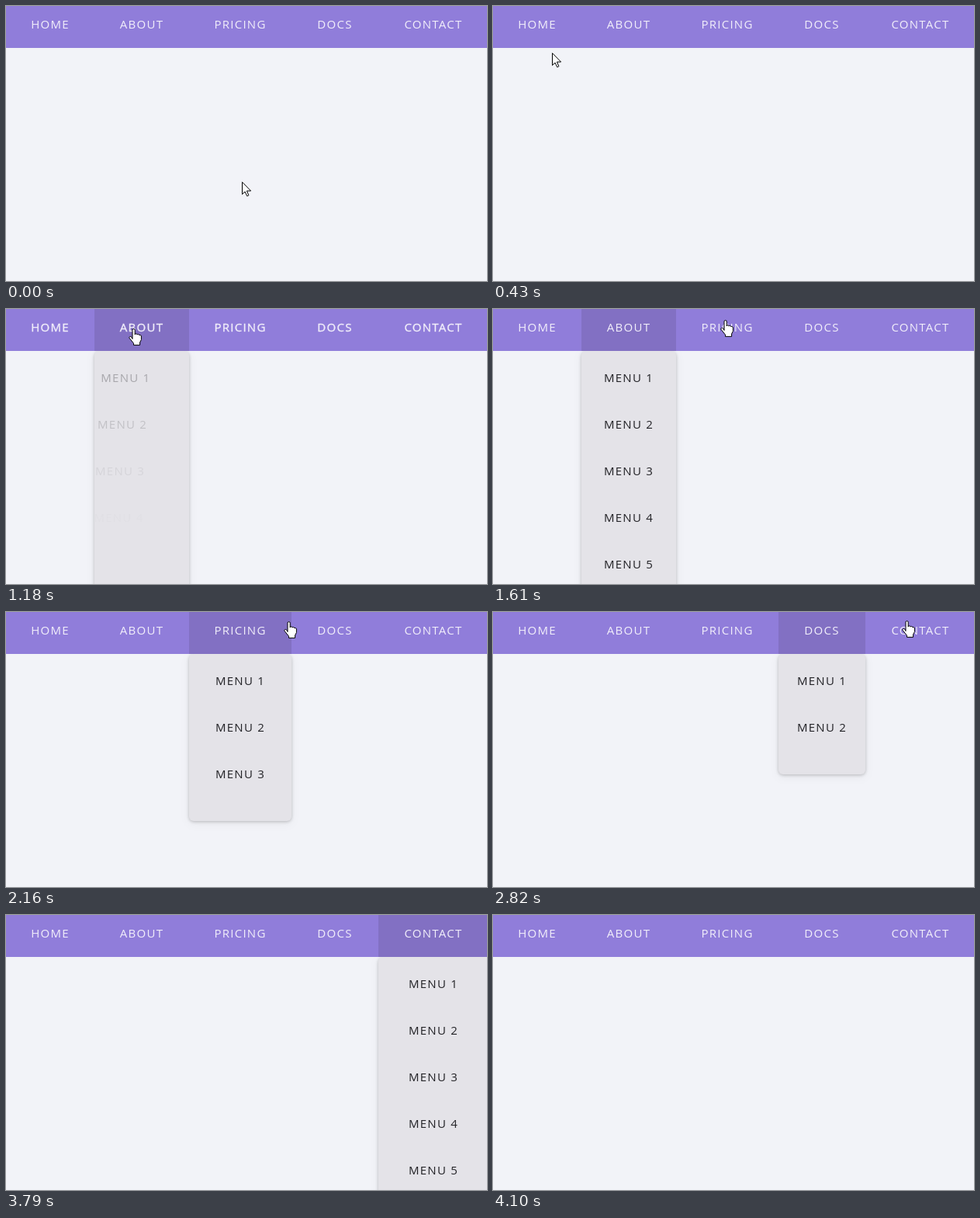
Animation, 620 px wide and 354 px high, one loop 4370 ms. Source, as an HTML page:

```html
<!DOCTYPE html>
<html lang="en">
<head>
<meta charset="utf-8">
<title>Dropdown menu</title>
<style>
  html, body { margin: 0; width: 100%; height: 100%; overflow: hidden; background: #f2f3f8; }
  svg { display: block; width: 620px; height: 354px; }
  text {
    font: 15px "Open Sans", "Noto Sans", sans-serif;
    letter-spacing: 1.25px;
    text-anchor: middle;
  }
  .bar { fill: #907dda; }
  .tab { fill: #8270c3; }
  .label { fill: #f1eefa; }
  .heavy .label { stroke: #f1eefa; stroke-width: .35px; }
  .panel {
    fill: #e4e3e8;
    filter: drop-shadow(0 1px 2px rgba(0, 0, 0, .22)) drop-shadow(0 3px 6px rgba(0, 0, 0, .05));
  }
  .item { fill: #222226; }
  .cursor { fill: #fff; stroke: #000; stroke-linejoin: round; }
</style>
</head>
<body>
<svg id="stage" viewBox="0 0 620 354">
  <g id="menus"></g>
  <rect class="bar" width="620" height="54"/>
  <g id="nav"></g>
  <path id="arrow" class="cursor" d="M.5.7V16.4L4.1 13 6.7 18.7 8.9 17.7 6.4 12H11.6Z"/>
  <path id="hand" class="cursor" d="M5 13.5V2.2a1.6 1.6 0 0 1 3.2 0V8q.3-1.3 1.5-1.2t1.5 1.4q.4-.9 1.4-.7t1.3 1.4q.5-.6 1.3-.4t1.2 1.5V14.5L14.6 18V21.4H6.5V19.2L1.2 12.6q-.7-1.2.3-1.9t2.2.4Z"/>
</svg>
<script>
const LOOP = 4370;
const ITEM_TIME = 300, STAGGER = 30, SLIDE = 30, PANEL_FADE = 140;

// The picture advances only at these moments.
const steps = [0, 280, 430, 590, 730, 880, 1040, 1180, 1310, 1460, 1610, 1740, 1880, 2010,
  2160, 2310, 2430, 2580, 2700, 2820, 2950, 3090, 3240, 3360, 3510, 3640, 3790, 3940, 4100];

// Cursor waypoints: time, x, y
const route = [[0, 304, 226], [280, 78, 81], [430, 76, 60], [590, 74, 30], [730, 74, 30],
  [880, 128, 27], [1460, 186, 24], [1610, 293, 14], [1740, 310, 14], [2010, 310, 14],
  [2160, 358, 12], [2310, 385, 11], [2820, 527, 11], [3240, 527, 11], [3360, 542, 27],
  [3510, 556, 110], [3640, 571, 217]];
const HAND_FROM = 590, CURSOR_GONE = 3790, MENU_GONE = 3940, REST = 4100;

// on/off: hover span, slide: first item starts, settle: labels turn light again
const tabs = [
  { name: "HOME", x: 0, w: 114, count: 5, on: 590, off: 1040, slide: 586, settle: 1040 },
  { name: "ABOUT", x: 114, w: 122, count: 5, on: 1040, off: 1740, slide: 1064, settle: 1610 },
  { name: "PRICING", x: 236, w: 132, count: 3, on: 1740, off: 2430, slide: 1745, settle: 2160 },
  { name: "DOCS", x: 368, w: 112, count: 2, on: 2430, off: 2950, slide: 2430, settle: 2820 },
  { name: "CONTACT", x: 480, w: 142, count: 5, on: 2950, off: MENU_GONE, slide: 2916, settle: 3360 }
];

const byId = id => document.getElementById(id);
const nav = byId("nav"), arrow = byId("arrow"), hand = byId("hand");
const clamp = v => Math.min(1, Math.max(0, v));
const within = (t, from, to) => t >= from && t < to;
const show = (el, on) => el.style.display = on ? "" : "none";

function add(parent, tag, attrs, content = "") {
  const el = document.createElementNS("http://www.w3.org/2000/svg", tag);
  for (const key in attrs) el.setAttribute(key, attrs[key]);
  el.textContent = content;
  return parent.appendChild(el);
}

// cubic-bezier(.42, 0, .58, 1)
function easeInOut(x) {
  let lo = 0, hi = 1;
  for (let i = 0; i < 20; i++) {
    const s = (lo + hi) / 2, r = 1 - s;
    if (1.26 * r * r * s + 1.74 * r * s * s + s * s * s < x) lo = s; else hi = s;
  }
  return lo * lo * (3 - 2 * lo);
}

for (const tab of tabs) {
  const { x, w, count } = tab, mid = x + w / 2;
  tab.back = add(nav, "rect", { class: "tab", x, width: w, height: 54 });
  add(nav, "text", { class: "label", x: mid, y: 29 }, tab.name);
  tab.menu = add(byId("menus"), "g", {});
  tab.panel = add(tab.menu, "rect",
    { class: "panel", x, y: 54, width: w, height: count * 60 + 35, rx: 6 });
  tab.items = Array.from({ length: count }, (_, i) =>
    add(tab.menu, "text", { class: "item", x: mid, y: 94 + i * 60 }, "MENU " + (i + 1)));
}

function cursorAt(t) {
  const i = route.findIndex(p => p[0] > t);
  if (i < 0) return route[route.length - 1].slice(1);
  const a = route[i - 1], b = route[i], k = (t - a[0]) / (b[0] - a[0]);
  return [1, 2].map(n => Math.round(a[n] + (b[n] - a[n]) * k));
}

function draw(t) {
  for (const tab of tabs) {
    const open = within(t, tab.on, tab.off);
    show(tab.back, open);
    show(tab.menu, open);
    if (!open) continue;
    tab.panel.style.opacity = clamp((t - tab.on) / PANEL_FADE);
    tab.items.forEach((item, i) => {
      const p = easeInOut(clamp((t - tab.slide - i * STAGGER) / ITEM_TIME));
      item.setAttribute("transform", `translate(${SLIDE * (p - 1)})`);
      item.style.opacity = p;
    });
  }
  const heavy = within(t, MENU_GONE, REST) || tabs.some(tab => within(t, tab.on, tab.settle));
  nav.setAttribute("class", heavy ? "heavy" : "");

  const place = `translate(${cursorAt(t)})`;
  arrow.setAttribute("transform", place);
  hand.setAttribute("transform", place);
  show(arrow, t < HAND_FROM);
  show(hand, within(t, HAND_FROM, CURSOR_GONE));
}

const start = performance.now();
let last = -1;
function tick() {
  const t = Math.max(0, performance.now() - start) % LOOP;
  const step = steps.filter(s => s <= t).pop();
  if (step !== last) draw(last = step);
  requestAnimationFrame(tick);
}
tick();
</script>
</body>
</html>
```
